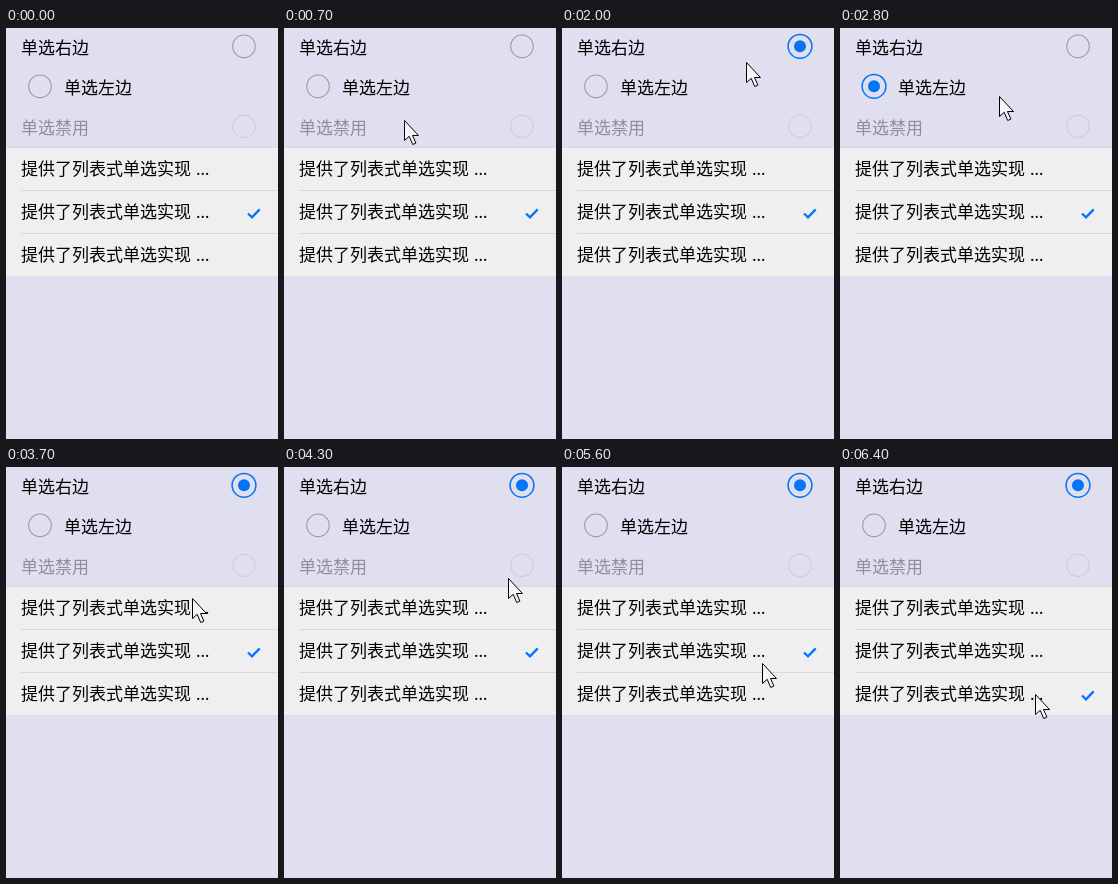
An HTML page with a canvas for the animation above (6.5 s loop, 272 by 411 pixels).

```html
<!DOCTYPE html>
<html lang="zh-CN">
<head>
<meta charset="utf-8">
<style>
  html, body { margin: 0; width: 100%; height: 100%; overflow: hidden; background: #e0dfef; }
  canvas { display: block; width: 272px; height: 411px; }
</style>
</head>
<body>
<canvas id="stage"></canvas>
<script>
const W = 272, H = 411, LOOP = 6500, STEP = 100;
const BLUE = '#0474f8', LINE = '#d9d9dc';
const LABEL_H = 40, ROW_TOP = 120, ROW_H = 43;

const canvas = document.getElementById('stage');
const ctx = canvas.getContext('2d');
const dpr = window.devicePixelRatio || 1;
canvas.width = W * dpr;
canvas.height = H * dpr;
ctx.scale(dpr, dpr);

// Radio clicks alternate left and right; row clicks go down the list.
const radioClicks = [1100, 1800, 2500, 3300];
const rowClicks = [5000, 5600, 6400];
const clicks = radioClicks.concat(rowClicks);

// Where the pointer has arrived at which time.
const stops = [
  [400, 253, 149], [900, 31, 54], [1300, 186, 87], [1700, 184, 18],
  [2000, 184, 34], [2400, 158, 64], [2800, 159, 68], [3000, 174, 112],
  [3200, 184, 22], [3700, 186, 131], [3900, 201, 116], [4300, 224, 111],
  [4500, 224, 111], [4900, 200, 156], [5400, 200, 196], [6100, 195, 227]
].map(([time, x, y]) => ({ time, x, y }));

const countUntil = (times, t) => times.filter(time => time <= t).length;
const mix = (a, b, k) => Math.round(a + (b - a) * k);

// The pointer rests at a stop until the click that follows it.
function pointerAt(t) {
  const n = countUntil(stops.map(s => s.time), t);
  if (n === 0) return null;
  const from = stops[n - 1], to = stops[n];
  if (!to) return from;
  const click = clicks.find(c => c > from.time && c < to.time);
  const leave = click || from.time;
  const k = Math.max(0, (t - leave) / (to.time - leave));
  return { x: mix(from.x, to.x, k), y: mix(from.y, to.y, k) };
}

function rect(x, y, w, h, color) {
  ctx.fillStyle = color;
  ctx.fillRect(x, y, w, h);
}

function label(text, x, y, color = '#000', family = '"Noto Sans CJK SC", "Noto Sans CJK"') {
  ctx.font = `300 17px ${family}, sans-serif`;
  ctx.fillStyle = color;
  ctx.fillText(text, x, y);
}

function ring(x, y, r, width, color) {
  ctx.beginPath();
  ctx.arc(x, y, r, 0, Math.PI * 2);
  ctx.lineWidth = width;
  ctx.strokeStyle = color;
  ctx.stroke();
}

function radio(x, y, on) {
  if (!on) return ring(x, y, 11.3, 1.1, '#a09a9a');
  ring(x, y, 11.9, 1.5, BLUE);
  ctx.beginPath();
  ctx.arc(x, y, 6, 0, Math.PI * 2);
  ctx.fillStyle = BLUE;
  ctx.fill();
}

function check(row) {
  const y = ROW_TOP + row * ROW_H;
  ctx.beginPath();
  ctx.moveTo(242, y + 22.5);
  ctx.lineTo(246, y + 26.3);
  ctx.lineTo(253.7, y + 18.4);
  ctx.lineWidth = 2.3;
  ctx.strokeStyle = BLUE;
  ctx.stroke();
}

function pointer({ x, y }) {
  ctx.save();
  ctx.translate(x + 0.5, y + 0.5);
  ctx.beginPath();
  [[0, 0], [0, 20], [4.7, 15.8], [8.2, 24], [11.4, 22.6], [8, 15], [14, 15]]
    .forEach(p => ctx.lineTo(...p));
  ctx.closePath();
  ctx.fillStyle = '#f6f6f8';
  ctx.fill();
  ctx.lineWidth = 1;
  ctx.strokeStyle = '#000';
  ctx.stroke();
  ctx.restore();
}

function drawRadios(t) {
  const n = countUntil(radioClicks, t);
  label('单选右边', 15, 26);
  label('单选左边', 58, 26 + LABEL_H);
  label('单选禁用', 15, 26 + LABEL_H * 2, '#908f97');
  radio(238, 18.3, n > 0 && n % 2 === 0);
  radio(34, 18.3 + LABEL_H, n % 2 === 1);
  ring(238, 18.3 + LABEL_H * 2, 11.3, 1, '#cdcad2');
}

function drawRows(t) {
  const n = countUntil(rowClicks, t);
  const pressed = t >= rowClicks[n] - STEP ? n : -1;
  rect(0, ROW_TOP, W, ROW_H * 3 - 1, '#efefef');
  rect(0, ROW_TOP - 1, W, 1, LINE);
  for (let i = 0; i < 3; i++) {
    const y = ROW_TOP + i * ROW_H;
    if (i === pressed) rect(0, y, W, ROW_H, '#dfdfdf');
    if (i < 2) rect(15, y + ROW_H - 1, W - 15, 1, LINE);
    label('提供了列表式单选实现', 15, y + 27);
    label('…', 190, y + 27, '#000', '"Noto Sans"');
  }
  check(n ? n - 1 : 1);
}

function draw(t) {
  rect(0, 0, W, H, '#e0dfef');
  drawRadios(t);
  drawRows(t);
  const pos = pointerAt(t);
  if (pos) pointer(pos);
}

const start = performance.now();
function tick() {
  const t = (performance.now() - start) % LOOP;
  draw(Math.floor(t / STEP) * STEP);
  requestAnimationFrame(tick);
}
tick();
</script>
</body>
</html>
```
